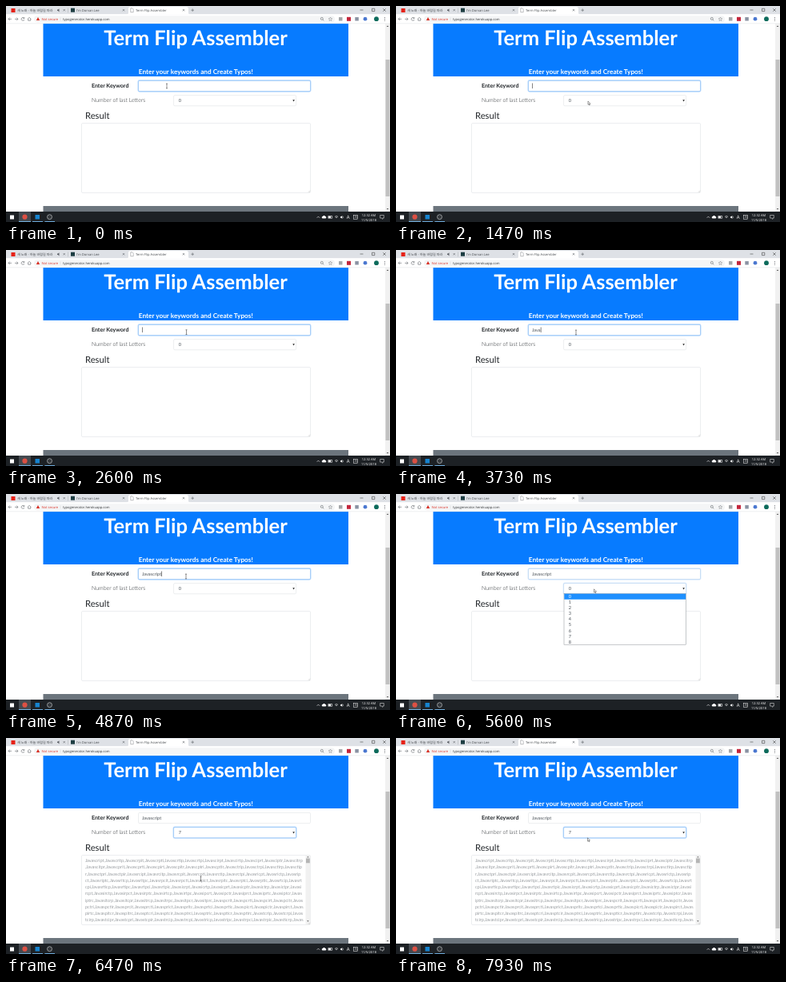
An HTML page for the animation above (8000 ms loop, 480 by 270 pixels).

```html
<!DOCTYPE html>
<html lang="en">
<head>
<meta charset="utf-8">
<title>Term Flip Assembler</title>
<style>
  html, body { margin: 0; width: 100%; height: 100%; overflow: hidden; background: #fff; }
  svg { display: block; width: 100vw; height: 100vh; }
  text { font-family: Lato, sans-serif; font-size: 5.62px; fill: #495057; white-space: pre; text-rendering: geometricPrecision; }
  .ui { font-family: "Open Sans", "Noto Sans CJK KR", "Noto Sans CJK", sans-serif; font-size: 4.1px; fill: #45494d; }
  .tray { font-family: "Open Sans", sans-serif; font-size: 4px; fill: #fff; }
  .light { font-weight: 300; }
  .bold { font-weight: 700; }
  .mid { text-anchor: middle; }
  .icon { fill: none; stroke: #5f6368; stroke-width: .6; }
  .white { stroke: #fff; }
  .box { fill: #fff; stroke: #ced4da; stroke-width: .4; }
  .ring rect { fill: none; stroke: #80bdff; stroke-width: .5; }
  .ring .glow { stroke: #007bff; stroke-opacity: .25; stroke-width: 1.1; }
</style>
</head>
<body>
<svg viewBox="0 0 480 270" preserveAspectRatio="none">
  <rect width="480" height="270" fill="#fff"/>

  <!-- page -->
  <rect x="46.5" y="21" width="381.5" height="67" fill="#077bff"/>
  <text class="bold mid" x="237" y="49" style="font-size:25.6px;fill:#fff">Term Flip Assembler</text>
  <text class="bold mid" x="237.3" y="85" style="font-size:8.25px;fill:#fff">Enter your keywords and Create Typos!</text>
  <text class="bold" x="107" y="102.4" style="font-size:7.03px;fill:#212529">Enter Keyword</text>
  <text class="light" x="107" y="120" style="font-size:7.03px;fill:#212529">Number of last Letters</text>
  <text x="99" y="141.3" style="font-size:11.24px;fill:#212529">Result</text>
  <rect x="46.5" y="250" width="381.5" height="8" fill="#6c757d"/>

  <rect class="box" x="165.5" y="93.4" width="215" height="13.2" rx="1.4"/>
  <g class="ring" id="inputRing">
    <rect class="glow" x="165" y="92.9" width="216" height="14.2" rx="1.8"/>
    <rect x="165.5" y="93.4" width="215" height="13.2" rx="1.4"/>
  </g>
  <text id="typed" x="170" y="102"></text>
  <rect id="caret" y="96.5" width=".6" height="6.6" fill="#333"/>

  <rect class="box" x="209.6" y="111.6" width="153" height="13.2" rx="1.4"/>
  <g class="ring" id="selectRing">
    <rect class="glow" x="209.1" y="111.1" width="154" height="14.2" rx="1.8"/>
    <rect x="209.6" y="111.6" width="153" height="13.2" rx="1.4"/>
  </g>
  <text id="value" x="215.8" y="120.3">0</text>
  <path d="M358.3 117.3h2.6l-1.3 2.2z" fill="#222"/>

  <rect class="box" x="94.5" y="146.5" width="286" height="87" rx="1.4"/>
  <g id="result">
    <rect x="374.5" y="146.8" width="5.8" height="86.4" fill="#f1f1f1"/>
    <rect x="375" y="150.5" width="4.8" height="5.8" fill="#b5b5b5"/>
    <path d="M376.2 149.3h2.4l-1.2-1.4zM376.2 228.3h2.4l-1.2 1.4z" fill="#555"/>
  </g>
  <path class="icon" d="M377.6 233l2.5-2.5M379 233l1.1-1.1" style="stroke:#999;stroke-width:.3"/>

  <g id="menu">
    <rect x="210" y="124.7" width="152.5" height="63.5" fill="#fff" stroke="#8a8f95" stroke-width=".5"/>
    <rect id="bar" x="210.3" width="151.9" height="7.05" fill="#1e90ff"/>
  </g>

  <rect x="474" y="22" width="6" height="235" fill="#f1f1f1"/>
  <rect x="474.5" y="67" width="5" height="171" fill="#c1c1c1"/>
  <path d="M475.7 26h2.6l-1.3-1.5zM475.7 253h2.6l-1.3 1.5z" fill="#505050"/>

  <!-- browser -->
  <rect width="480" height="10.5" fill="#dee1e6"/>
  <rect y="10.3" width="480" height="11.7" fill="#fff"/>
  <path d="M151 10.5q2 0 2-2v-5q0-2.500 2.500-2.500h70q2.500 0 2.500 2.500v5q0 2 2 2z" fill="#fff"/>
  <rect x="35" y="12.2" width="376" height="8" rx="4" fill="#f4f5f6"/>
  <path d="M0 21.800h480" stroke="#dcdfe2" stroke-width=".5"/>
  <rect x="6.500" y="3" width="5" height="5" fill="#e62117"/>
  <text class="ui" x="14" y="6.800">새 노래 - 하늘 바람길 따라</text>
  <path d="M64 4.500h1l1.500-1.300v4.200l-1.500-1.300h-1z" fill="#5f6368"/>
  <rect x="81" y="2.700" width="5" height="5" fill="#1d3d42"/>
  <text class="ui" x="88" y="6.800">I'm Dorvan Lee</text>
  <path d="M77.500 2.500v6" stroke="#a0a4a8" stroke-width=".4"/>
  <path class="icon" d="M155.800 2.800h2.200l1.200 1.200v3.800h-3.400z" style="stroke-width:.4"/>
  <text class="ui" x="162" y="6.800" fill="#333">Term Flip Assembler</text>
  <path class="icon" d="M71.500 4l2.400 2.400m0-2.400l-2.400 2.400M145.800 4l2.400 2.400m0-2.400l-2.400 2.400M220.800 4l2.400 2.400m0-2.400l-2.400 2.400M231.400 5.200h3.600M233.200 3.400v3.600"/>
  <path class="icon" d="M442.500 5h4M457.500 3.300h3.300v3.300h-3.300zM471.300 3.300l3.400 3.400m0-3.400l-3.400 3.400" style="stroke:#222;stroke-width:.5"/>
  <path class="icon" d="M7 16.300h-4m1.800-1.800l-1.800 1.800 1.800 1.800M11 16.300h4m-1.800-1.800l1.800 1.800-1.800 1.800M22.500 15a1.900 1.900 0 1 0 .4 2M22.900 14v1.500h-1.500M27 16.300l2.200-2 2.200 2M27.700 16v2.200h3V16"/>
  <path d="M40 14.100l2.200 4h-4.400z" fill="#d93025"/>
  <text class="ui" x="44.500" y="17.800" style="fill:#d93025">Not secure</text>
  <path d="M68 14.300v4" stroke="#c4c7ca" stroke-width=".4"/>
  <text class="ui" x="71" y="17.800" style="fill:#303336">typogenerator.herokuapp.com</text>
  <circle class="icon" cx="394.800" cy="15.800" r="1.500"/>
  <path class="icon" d="M396 17l1.300 1.300"/>
  <path class="icon" d="M405.500 14l.7 1.500 1.600.2-1.200 1.100.3 1.600-1.400-.8-1.400.8.3-1.600-1.200-1.100 1.600-.2z" style="stroke-width:.4"/>
  <rect x="416" y="14" width="4.500" height="4.500" fill="#a4a7aa"/>
  <rect x="426" y="13.800" width="5" height="5" fill="#c4263c"/>
  <rect x="436.300" y="14" width="4.500" height="4.500" fill="#8b93a3"/>
  <circle cx="449" cy="16.200" r="2.400" fill="#4b78d0"/>
  <circle cx="463" cy="16.200" r="2.900" fill="#0d6b5c"/>
  <path d="M473.500 14v.9m0 1v.9m0 1v.9" stroke="#5f6368" stroke-width=".9"/>

  <!-- taskbar -->
  <rect y="257" width="480" height="13" fill="#1d2125"/>
  <rect x="16" y="257" width="15" height="13" fill="#444a50"/>
  <path d="M16 269.500h15M33 269.500h13M48.500 269.500h12.500" stroke="#76b9ed" stroke-width=".9"/>
  <rect x="5" y="261.500" width="5" height="5" fill="#fff"/>
  <circle cx="23.500" cy="263.700" r="3.100" fill="#dd5144"/>
  <rect x="36.500" y="261" width="5.500" height="5.500" fill="#1684d0"/>
  <circle cx="54.500" cy="263.700" r="3" fill="#34383c" stroke="#d5d7d9" stroke-width=".6"/>
  <path class="icon white" d="M388.700 264.800l1.700-1.700 1.700 1.700M402.800 262.500h4.800v2.800h-4.800zM411 263.500q2-2 4 0M412 264.700q1-1 2 0"/>
  <path d="M395.500 265.500a1.300 1.300 0 0 1 .4-2.500 1.800 1.800 0 0 1 3.300 0 1.300 1.300 0 0 1 .3 2.500zM403.200 263h2.800v2h-2.800zM418 263.200h1l1.300-1.200v4l-1.300-1.200h-1z" fill="#fff"/>
  <path class="icon white" d="M421.300 262.800q.8 1.200 0 2.400" style="stroke-width:.4"/>
  <text class="tray" x="425.700" y="266" style="font-size:6px">A</text>
  <rect x="434.600" y="261.500" width="4.800" height="4.800" fill="none" stroke="#fff" stroke-width=".5"/>
  <path class="icon white" d="M436 262.700h1.300l-1 2.300M438.200 262.500v3" style="stroke-width:.4"/>
  <text class="tray mid" x="453.500" y="262.700">12:32 AM</text>
  <text class="tray mid" x="453.500" y="268.700">11/5/2018</text>
  <path class="icon white" d="M467.700 261.500h4.600v3.600h-1.500v1.300l-1.400-1.300h-1.700z" style="stroke-width:.5"/>

  <g id="pointer">
    <path id="arrow" d="M0 0v4.300l1-.9.700 1.600.7-.3-.7-1.500h1.300z" fill="#fff" stroke="#111" stroke-width=".4"/>
    <path id="beam" d="M-1 -2.900h2M0 -2.900v5.800M-1 2.900h2" fill="none" stroke="#222" stroke-width=".5"/>
  </g>
</svg>
<script>
  const LOOP = 8000, ROW = 7.05, MENU_TOP = 124.7;
  const word = "Javascript";
  const keyTimes = [3130, 3400, 3530, 3730, 4000, 4130, 4270, 4400, 4530, 4870];
  const blinkStarts = [200, 2400, ...keyTimes];
  const path = [
    [0, 201, 100], [1070, 201, 100], [1470, 240, 119], [1600, 240, 119], [1800, 238.500, 127.800],
    [2010, 238.500, 127.800], [2400, 228, 101], [2670, 225, 103], [5210, 225, 103],
    [5500, 247.500, 118.800], [5610, 247.500, 118.800], [5860, 243.800, 168.500],
    [6070, 243.500, 175.500], [6330, 243.500, 176], [6610, 243.500, 176], [7000, 189, 184],
    [7400, 242, 163], [7670, 241.500, 164], [7930, 239.500, 124.800]
  ];

  const $ = id => document.getElementById(id);
  const show = (id, on) => $(id).setAttribute("visibility", on ? "visible" : "hidden");
  const clamp = (v, lo, hi) => Math.min(hi, Math.max(lo, v));
  const fade = (t, start) => clamp((t - start) / 150, 0, 1);

  function addText(parent, x, y, str, cls = "") {
    const el = document.createElementNS("http://www.w3.org/2000/svg", "text");
    el.setAttribute("x", x);
    el.setAttribute("y", y);
    el.setAttribute("class", cls);
    el.textContent = str;
    return $(parent).appendChild(el);
  }

  const permute = s => s.length < 2 ? [s] : [...s].flatMap((c, i) =>
    permute(s.slice(0, i) + s.slice(i + 1)).map(p => c + p));

  const typos = permute(word.slice(-6)).map(p => word.slice(0, -6) + p).join(",");
  const lineStart = i => 120 * i + Math.max(0, i - 6);
  for (let i = 0; i < 10; i++)
    addText("result", 98.9, 155 + i * 8.27, typos.slice(lineStart(i), lineStart(i + 1)), "light");

  const options = Array.from({ length: 9 }, (_, i) =>
    addText("menu", 215.8, MENU_TOP + 5.500 + i * ROW, i));

  function pointerAt(t) {
    const i = path.findIndex(p => p[0] > t);
    if (i < 0) return path[path.length - 1].slice(1);
    const [t0, x0, y0] = path[i - 1], [t1, x1, y1] = path[i];
    let k = (t - t0) / (t1 - t0);
    k = k * k * (3 - 2 * k);
    return [x0 + (x1 - x0) * k, y0 + (y1 - y0) * k];
  }

  function draw(t) {
    const step = Math.floor((t + 5) * 0.015) / 0.015;
    const [x, y] = pointerAt(step);
    const open = (t >= 1530 && t < 1870) || (t >= 5530 && t < 6470);
    const done = t >= 6470;

    const focus = 1 - fade(t, 1530) + fade(t, 2400) - fade(t, 5530);
    $("inputRing").setAttribute("opacity", focus);
    $("selectRing").setAttribute("opacity", 1 - focus);

    $("typed").textContent = word.slice(0, keyTimes.filter(k => k <= t).length);
    const since = t - blinkStarts.filter(b => b <= t).pop();
    const focused = t < 1530 || (t >= 2400 && t < 5530);
    $("caret").setAttribute("x", 170.200 + $("typed").getComputedTextLength());
    show("caret", focused && since % 1060 < 530);

    $("value").textContent = done ? 7 : 0;
    show("result", done);
    show("menu", open);
    const row = clamp(Math.floor((y - MENU_TOP) / ROW), 0, 8);
    $("bar").setAttribute("y", MENU_TOP + row * ROW);
    options.forEach((o, i) => o.style.fill = i === row ? "#fff" : "");

    const overField = !open && (y < 107 || (y > 146 && y < 234));
    $("pointer").setAttribute("transform", `translate(${x} ${y})`);
    show("beam", overField);
    show("arrow", !overField);
  }

  const begin = performance.now();
  function tick() {
    draw((performance.now() - begin) % LOOP);
    requestAnimationFrame(tick);
  }
  tick();
</script>
</body>
</html>
```
